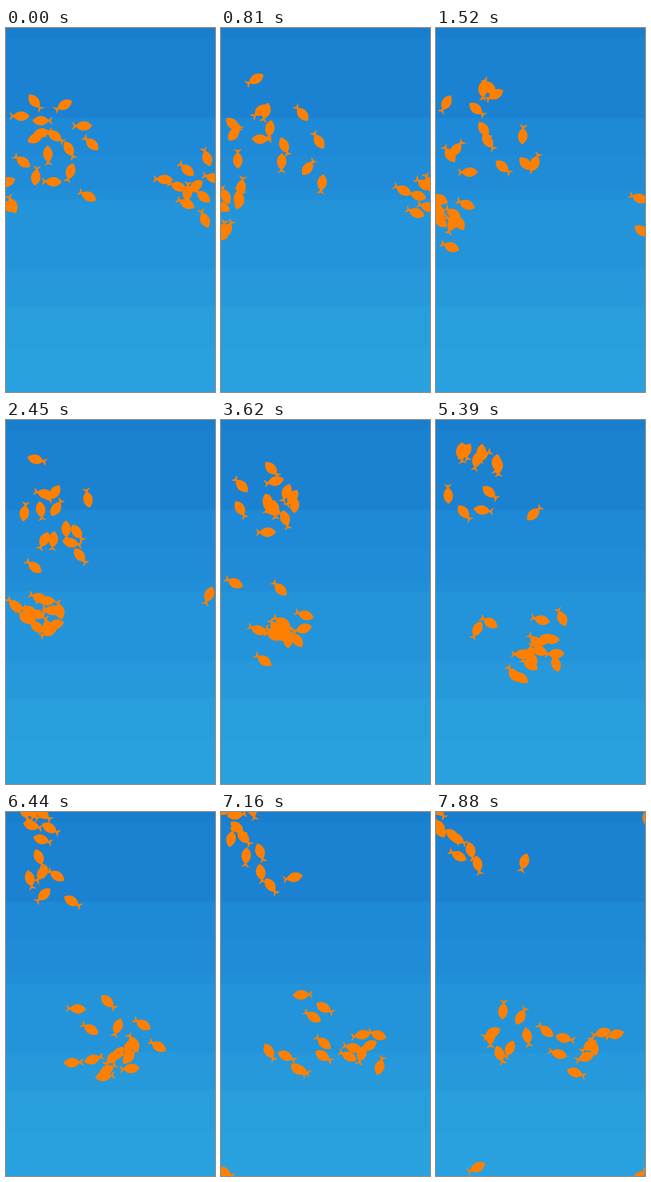
These frames come from a looping animation (364 by 632 pixels, 8000 ms). An HTML page with a canvas:

```html
<!DOCTYPE html>
<html lang="en">
<head>
<meta charset="utf-8">
<title>Fish school</title>
<style>
html, body { margin: 0; width: 100%; height: 100%; overflow: hidden; background: #2394da; }
canvas { display: block; width: 364px; height: 632px; }
</style>
</head>
<body>
<canvas id="sea" width="364" height="632"></canvas>
<script>
const ctx = document.getElementById('sea').getContext('2d');
const LOOP = 8000, STEP = 117.4, STEPS = 68;
const SPEED = 6.6, MAX_TURN = 0.2, LEAD = 4;
const EDGE = 10, WORLD_W = 384, WORLD_H = 653;

const bands = [
  [0, '#197ece'], [17, '#1b81d1'], [88, '#1b82d2'], [156, '#1e8ad7'],
  [222, '#208cd8'], [280, '#218fd8'], [298, '#2394da'], [418, '#2698db'],
  [445, '#2699db'], [483, '#289edd'], [556, '#2aa1df']
];

// Each shoal has a drifting centre; starts are x, y, heading in degrees.
const shoals = [
  {
    spread: 0.6,
    centre: n => [90 - 55 * (n / STEPS) ** 3, 200 - 2.6 * n],
    starts: [
      [50, 128, -129], [101, 134, -30], [25, 153, 0], [62, 161, 180],
      [134, 170, 0], [149, 201, 42], [52, 191, 155], [63, 182, 170],
      [73, 220, -93], [86, 188, -145], [81, 267, 2], [112, 250, -72],
      [143, 292, 26]
    ]
  },
  {
    spread: 0.45,
    centre: n => [-50 + 4.35 * n, 280 + 2.65 * Math.min(n, 50)],
    starts: [
      [110, 211, -118], [29, 232, 35], [52, 258, 97], [1, 268, -20],
      [11, 307, 68], [3, 309, 35], [-109, 263, 4], [-69, 246, 40],
      [-34, 225, 70], [-85, 275, 20], [-70, 305, 25], [-38, 332, 68],
      [-41, 292, 40], [-54, 275, -40], [-68, 285, 95], [-24, 260, 15]
    ]
  }
];

const clamp = (v, limit) => Math.max(-limit, Math.min(limit, v));
const wrap = (v, size) => ((v + EDGE) % size + size) % size - EDGE;

// Constant speed; the heading bends towards a slot that moves with the shoal.
function swim([x, y, deg], shoal, phase) {
  const [cx, cy] = shoal.centre(0);
  const slotX = (x - cx) * shoal.spread, slotY = (y - cy) * shoal.spread;
  let angle = deg * Math.PI / 180;
  const track = [];
  for (let n = 0; n < STEPS; n++) {
    track.push({ x, y, angle });
    const [gx, gy] = shoal.centre(n + LEAD);
    const aim = Math.atan2(gy + slotY - y, gx + slotX - x) - angle;
    const error = Math.atan2(Math.sin(aim), Math.cos(aim));
    angle += clamp(error * 0.25, MAX_TURN) + 0.08 * Math.sin(n * 0.25 + phase);
    x += SPEED * Math.cos(angle);
    y += SPEED * Math.sin(angle);
  }
  return track;
}

const tracks = shoals.flatMap(shoal =>
  shoal.starts.map((start, i) => swim(start, shoal, i * 2.4)));

const body = new Path2D('M16 0C8 -11 -5 -11 -13 0C-5 11 8 11 16 0Z');
const tail = new Path2D('M-10 0Q-14 -3 -18.5 -7Q-18 -3 -16 0Q-18 3 -18.5 7Q-14 3 -10 0Z');

function drawFish({ x, y, angle }) {
  ctx.save();
  ctx.translate(wrap(x, WORLD_W), wrap(y, WORLD_H));
  ctx.rotate(angle);
  ctx.fill(body);
  ctx.fill(tail);
  ctx.restore();
}

function draw(now) {
  const step = Math.min(STEPS - 1, Math.floor((now % LOOP + 20) / STEP));
  for (const [y, color] of bands) {
    ctx.fillStyle = color;
    ctx.fillRect(0, y, 364, 632 - y);
  }
  ctx.fillStyle = '#ff8000';
  for (const track of tracks) drawFish(track[step]);
}

let start;
function tick(now) {
  start ??= now;
  draw(now - start);
  requestAnimationFrame(tick);
}
draw(0);
requestAnimationFrame(tick);
</script>
</body>
</html>
```
